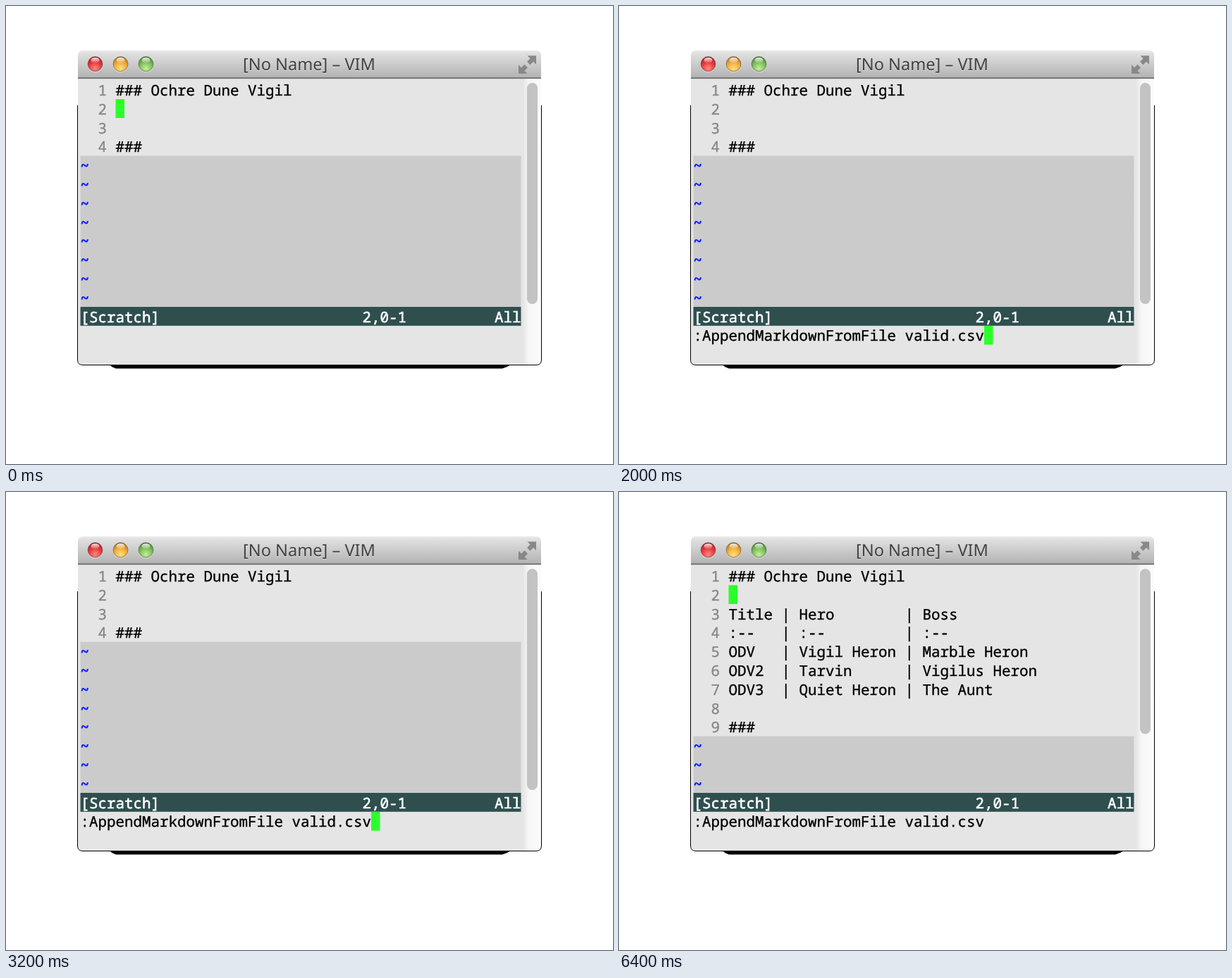
Write an HTML page that moves like this. It is 861x650 px and loops after 8 s.

```html
<!DOCTYPE html>
<html lang="en">
<head>
<meta charset="utf-8">
<title>Vim window</title>
<style>
  html, body { margin: 0; width: 100%; height: 100%; overflow: hidden; background: #fff; }
  svg { display: block; }
  text { white-space: pre; text-rendering: geometricPrecision; }
  .mono { font: 20.833px "Noto Sans Mono", "DejaVu Sans Mono", monospace; stroke-width: .35px; }
  .title { font: 23.6px "Noto Sans", "Open Sans", sans-serif; text-anchor: middle; }
  .code { fill: #000; stroke: #000; }
  .num { fill: #868686; stroke: #868686; }
  .tilde { fill: #0a1cff; stroke: #0a1cff; stroke-width: .8px; }
  .status { fill: #fff; stroke: #fff; stroke-width: .6px; }
  .cursor { fill: #2bff2b; }
  .before, .after, .normal, .typed, .prompt { animation: 8s step-end infinite; }
  .before { animation-name: before; }
  .after { animation-name: after; }
  .normal { animation-name: normal; }
  .typed { animation-name: typed; }
  .prompt { animation-name: prompt; }
  @keyframes before { 0% { opacity: 1 } 50%, 100% { opacity: 0 } }
  @keyframes after { 0% { opacity: 0 } 50%, 100% { opacity: 1 } }
  @keyframes normal { 0% { opacity: 1 } 25% { opacity: 0 } 50%, 100% { opacity: 1 } }
  @keyframes typed { 0% { opacity: 0 } 25%, 100% { opacity: 1 } }
  @keyframes prompt { 0% { opacity: 0 } 25% { opacity: 1 } 50%, 100% { opacity: 0 } }
</style>
</head>
<body>
<svg width="861" height="650" viewBox="0 0 861 650">
  <defs>
    <linearGradient id="bar" x2="0" y2="1">
      <stop offset="0" stop-color="#ececec"/>
      <stop offset=".1" stop-color="#e0e0e0"/>
      <stop offset="1" stop-color="#b2b2b2"/>
    </linearGradient>
    <linearGradient id="track">
      <stop offset="0" stop-color="#e4e4e4"/>
      <stop offset=".3" stop-color="#f6f6f6"/>
      <stop offset="1" stop-color="#fbfbfb"/>
    </linearGradient>
    <linearGradient id="shine" x2="0" y2="1">
      <stop offset="0" stop-color="#fff" stop-opacity=".9"/>
      <stop offset="1" stop-color="#fff" stop-opacity=".1"/>
    </linearGradient>
    <radialGradient id="red" cy=".8" r=".85">
      <stop offset="0" stop-color="#ff8a80"/><stop offset=".5" stop-color="#e63a3c"/><stop offset="1" stop-color="#a3191f"/>
    </radialGradient>
    <radialGradient id="amber" cy=".8" r=".85">
      <stop offset="0" stop-color="#ffe27a"/><stop offset=".5" stop-color="#f0ac3c"/><stop offset="1" stop-color="#a8661c"/>
    </radialGradient>
    <radialGradient id="green" cy=".8" r=".85">
      <stop offset="0" stop-color="#c4f09a"/><stop offset=".5" stop-color="#7fbf5a"/><stop offset="1" stop-color="#3c7a2c"/>
    </radialGradient>
    <clipPath id="frame"><rect x="102" y="63" width="657" height="446" rx="7"/></clipPath>
  </defs>

  <path d="M147 509H716L711 512L704 514.5H156L150 512Z"/>
  <g clip-path="url(#frame)">
    <rect x="102" y="63" width="657" height="446" fill="#e5e5e5"/>
    <rect x="733" y="103" width="26" height="406" fill="url(#track)"/>
    <rect x="102" y="63" width="657" height="39" fill="url(#bar)"/>
    <rect x="102" y="101.5" width="657" height="1.7" fill="#686868"/>
  </g>
  <path d="M101.5 141V502Q101.5 509.5 109 509.5H752Q759.5 509.5 759.5 502V141" fill="none" stroke="#000"/>

  <g id="lights"></g>
  <text class="title" x="430" y="92.3" fill="#eee" opacity=".7">[No Name] – VIM</text>
  <text class="title" x="430" y="91" fill="#414141">[No Name] – VIM</text>
  <g fill="#888">
    <path d="M739.5 70.5H752V83L748 79L743.5 83.5L739 79L743.5 74.5Z"/>
    <path d="M739.5 96H727V83.5L731 87.5L735.5 83L740 87.5L735.5 92Z"/>
  </g>

  <rect class="before" x="739" y="109" width="15" height="314" rx="7.5" fill="#c3c3c3"/>
  <rect class="after" x="739" y="109" width="15" height="234.5" rx="7.5" fill="#c3c3c3"/>
  <g id="screen" class="mono"></g>
</svg>
<script>
  const X = 105.5, Y = 105.4, COL = 12.5, ROW = 26.8;
  const LAST = 12;

  function make(parent, tag, attrs, content = "") {
    const el = document.createElementNS("http://www.w3.org/2000/svg", tag);
    for (const key in attrs) el.setAttribute(key, attrs[key]);
    el.textContent = content;
    return parent.appendChild(el);
  }

  const write = (parent, row, col, content, cls) =>
    make(parent, "text", { x: X + col * COL, y: Y + row * ROW + 21.6, class: cls }, content);

  const block = (parent, row, col, cols, rows, attrs) =>
    make(parent, "rect", { x: X + col * COL, y: Y + row * ROW, width: cols * COL, height: rows * ROW, ...attrs });

  function buffer(cls, lines) {
    const g = make(screenEl, "g", { class: cls });
    block(g, lines.length, 0, 50, LAST - lines.length, { fill: "#cbcbcb" });
    lines.forEach((line, i) => {
      write(g, i, 2, i + 1, "num");
      write(g, i, 4, line, "code");
    });
    for (let row = lines.length; row < LAST; row++) write(g, row, 0, "~", "tilde");
  }

  const lights = document.getElementById("lights");
  ["red", "amber", "green"].forEach((name, i) => {
    const cx = 126.5 + 36 * i;
    make(lights, "circle", { cx, cy: 83.3, r: 11, fill: "#fff", opacity: .45 });
    make(lights, "circle", { cx, cy: 82.3, r: 10.5, fill: `url(#${name})`, stroke: "#333", "stroke-opacity": .5 });
    make(lights, "ellipse", { cx, cy: 77, rx: 6, ry: 3.8, fill: "url(#shine)" });
  });

  const screenEl = document.getElementById("screen");
  const heading = "### Ochre Dune Vigil";
  const row = (a, b, c) => `${a.padEnd(5)} | ${b.padEnd(11)} | ${c}`;

  buffer("before", [heading, "", "", "###"]);
  buffer("after", [
    heading, "",
    row("Title", "Hero", "Boss"),
    row(":--", ":--", ":--"),
    row("ODV", "Vigil Heron", "Marble Heron"),
    row("ODV2", "Tarvin", "Vigilus Heron"),
    row("ODV3", "Quiet Heron", "The Aunt"),
    "", "###"
  ]);
  block(screenEl, 1, 4, 1, 1, { class: "cursor normal" });

  block(screenEl, LAST, 0, 50, 1, { fill: "#2f4f4f" });
  write(screenEl, LAST, 0, "[Scratch]", "status");
  write(screenEl, LAST, 32, "2,0-1", "status");
  write(screenEl, LAST, 47, "All", "status");

  const command = ":AppendMarkdownFromFile valid.csv";
  write(screenEl, LAST + 1, 0, command, "code typed");
  block(screenEl, LAST + 1, command.length, 1, 1, { class: "cursor prompt" });
</script>
</body>
</html>
```
